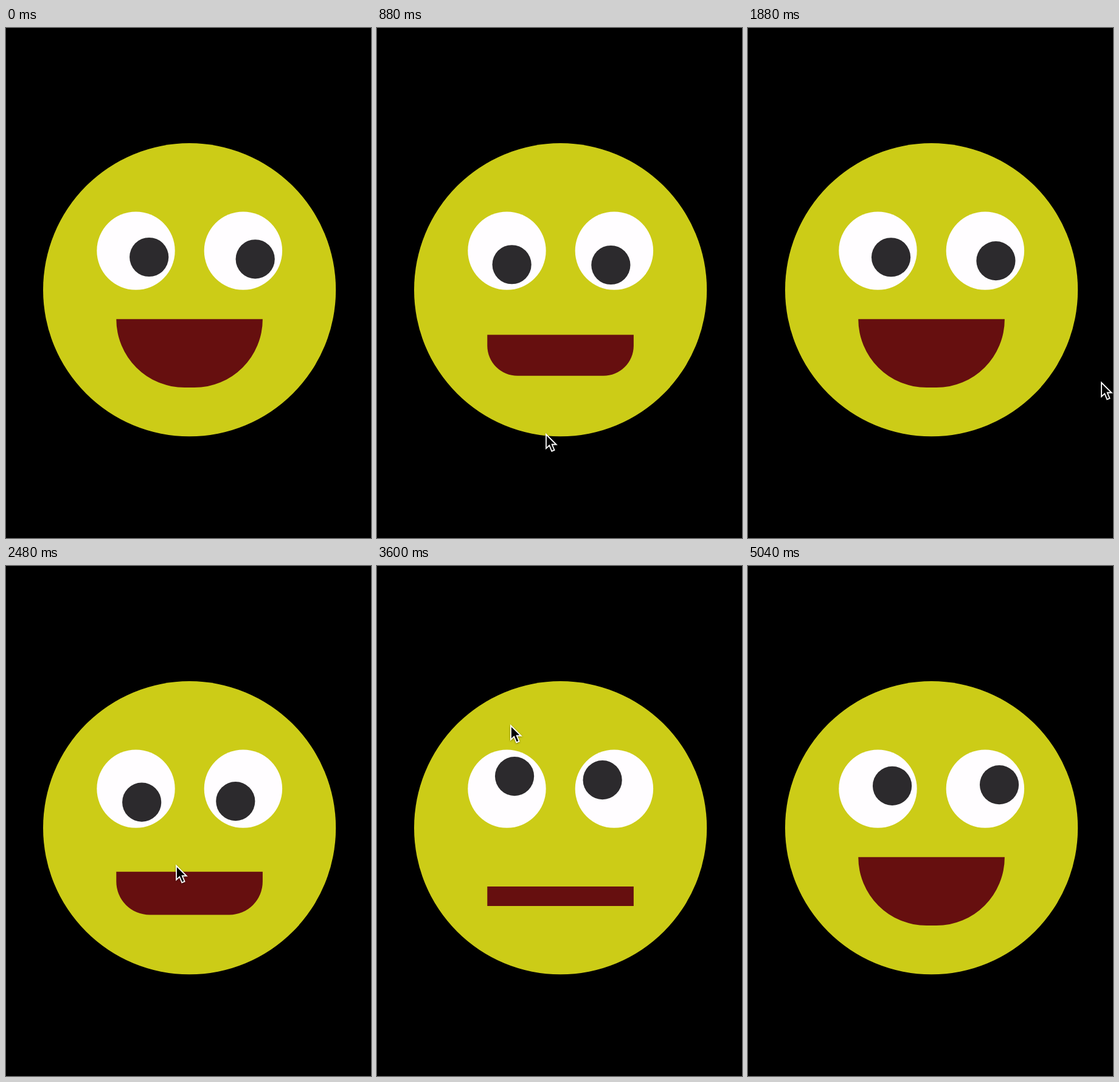
An HTML page for the animation above (5120 ms loop, 600 by 837 pixels).

```html
<!DOCTYPE html>
<html lang="en">
<head>
<meta charset="utf-8">
<title>Watching face</title>
<style>
  html, body { margin: 0; width: 100%; height: 100%; overflow: hidden; background: #000; }
  svg { display: block; width: 600px; height: 837px; }
  #cursor { filter: drop-shadow(0 1.5px 1.5px #0006); }
</style>
</head>
<body>
<svg viewBox="0 0 600 837">
  <circle cx="301.6" cy="429.7" r="240.6" fill="#cccc17"/>
  <g fill="#fffdff">
    <circle cx="213.5" cy="365.6" r="64.2"/>
    <circle cx="389.9" cy="365.6" r="64.2"/>
  </g>
  <g fill="#2c2a2d">
    <circle class="pupil" r="32.1"/>
    <circle class="pupil" r="32.1"/>
  </g>
  <path id="mouth" fill="#660f0f"/>
  <path id="cursor" d="M0 0V23L5.3 18L9.2 27.5L13.6 25.7L9.7 16.5H16.7Z" fill="#000" stroke="#fff" stroke-width="1.8"/>
</svg>
<script>
const LOOP = 5120, STEP = 40, LAG = 40, FADE = 600;
const UNIT = 1.604, REACH = 15 * UNIT;
const EYES = [[213.5, 365.6], [389.9, 365.6]];

// Key points of the pointer: time, x, y
const PATH = [
  // in from the right, past the chin
  [120, 787, 640], [280, 556, 700], [840, 320, 662], [880, 278, 667],
  // clockwise around the face
  [1200, 0, 628], [1380, 10, 340], [1540, 280, 184], [1700, 515, 300],
  [1840, 588, 551], [1880, 581, 582], [2080, 445, 744],
  // up into the face and around the eyes
  [2320, 181, 629], [2440, 287, 533], [2480, 280, 492], [2880, 290, 490],
  [3300, 415, 305], [3560, 269, 275], [3600, 220, 262], [3960, 150, 480],
  [4360, 535, 330]
];
const EXIT = [816, 245];
const HOVER = [[686, 890], [2300, 4370]];

const pupils = document.querySelectorAll('.pupil');
const mouth = document.getElementById('mouth');
const cursor = document.getElementById('cursor');

// Smooth curve through the key points
function pointer(t) {
  if (t >= PATH.at(-1)[0]) return EXIT;
  if (t <= PATH[0][0]) return PATH[0].slice(1);
  const i = PATH.findIndex(k => k[0] > t) - 1;
  const a = PATH[i], b = PATH[i + 1];
  const prev = PATH[i - 1] || a, next = PATH[i + 2] || b;
  const span = b[0] - a[0], u = (t - a[0]) / span, v = 1 - u;
  return [1, 2].map(c => {
    const ma = (b[c] - prev[c]) / (b[0] - prev[0]) * span;
    const mb = (next[c] - a[c]) / (next[0] - a[0]) * span;
    return v * v * (1 + 2 * u) * a[c] + u * v * v * ma
      + u * u * (1 + 2 * v) * b[c] - u * u * v * mb;
  });
}

// The CSS "ease" curve
function ease(x) {
  if (x <= 0) return 0;
  if (x >= 1) return 1;
  let lo = 0, hi = 1;
  for (let n = 0; n < 20; n++) {
    const s = (lo + hi) / 2;
    if (0.75 * s * (1 - s) + s ** 3 < x) lo = s; else hi = s;
  }
  return 0.3 * lo * (1 - lo) ** 2 + 3 * lo * lo * (1 - lo) + lo ** 3;
}

// 0 = open smile, 1 = flat mouth
function flatness(t) {
  const span = HOVER.filter(h => t >= h[0]).pop();
  if (!span) return 0;
  const [on, off] = span;
  if (t < off) return ease((t - on) / FADE);
  const peak = ease((off - on) / FADE);
  return peak * (1 - ease((t - off) / (FADE * peak)));
}

// The mouth box moves in whole layout units
function mouthShape(p) {
  const top = 477.8 + Math.floor(30 * p) * UNIT;
  const bottom = top + Math.round(70 - 50 * p) * UNIT;
  const left = 181.3, right = left + 150 * UNIT, r = 70 * (1 - p) * UNIT;
  return `M${left} ${top}H${right}V${bottom - r}a${r} ${r} 0 0 1 ${-r} ${r}`
    + `H${left + r}a${r} ${r} 0 0 1 ${-r} ${-r}Z`;
}

function draw(time) {
  const t = Math.floor(time % LOOP / STEP) * STEP;
  const [x, y] = pointer(t);
  cursor.setAttribute('transform', `translate(${x} ${y})`);

  const [ax, ay] = pointer(t - LAG);
  EYES.forEach(([ex, ey], i) => {
    const angle = Math.atan2(ay - ey, ax - ex);
    pupils[i].setAttribute('cx', ex + REACH * Math.cos(angle));
    pupils[i].setAttribute('cy', ey + REACH * Math.sin(angle));
  });

  mouth.setAttribute('d', mouthShape(flatness(t)));
}

const start = performance.now();
function tick() {
  draw(performance.now() - start);
  requestAnimationFrame(tick);
}
tick();
</script>
</body>
</html>
```
